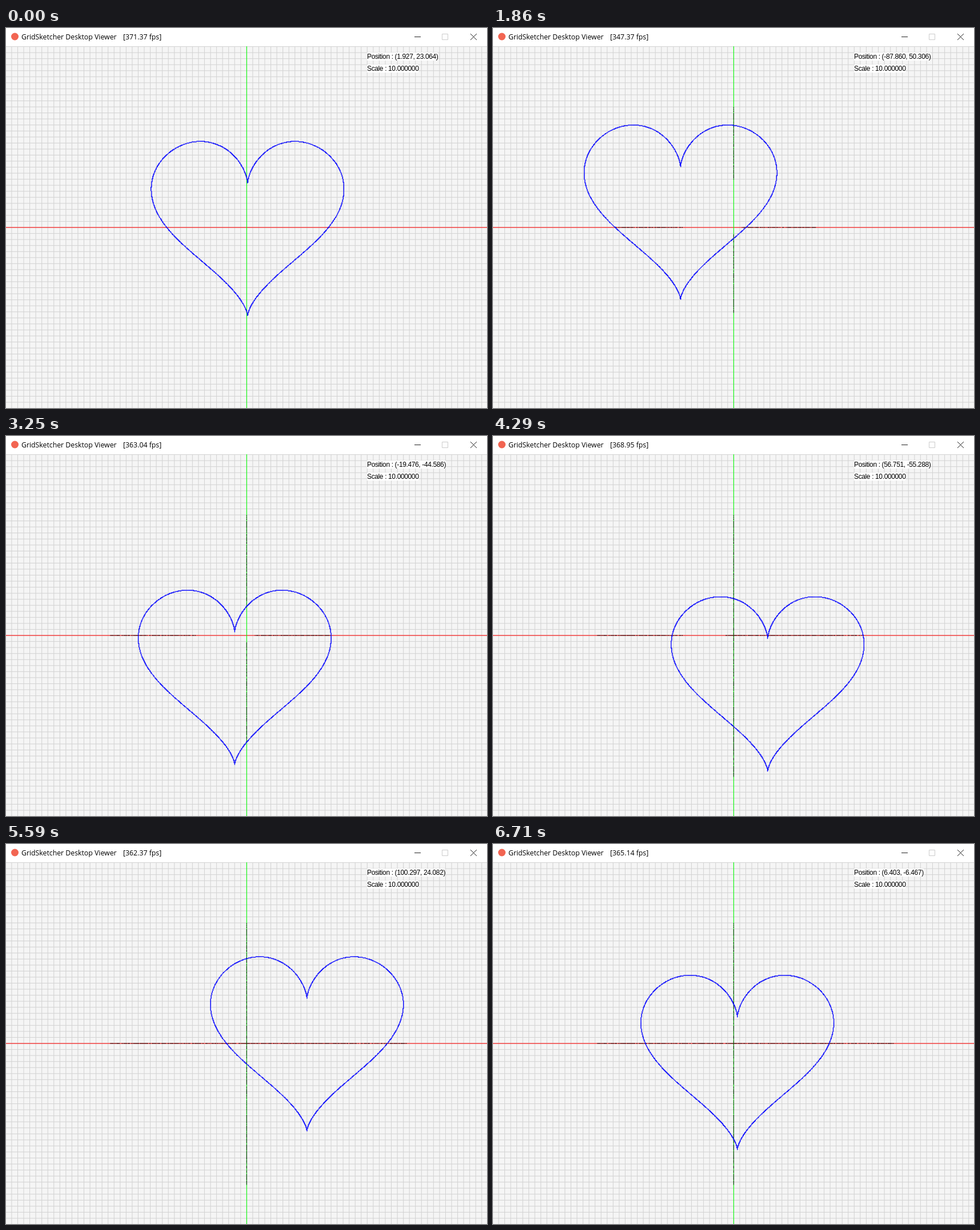
An HTML page with a canvas that plays this animation: 842 by 665 pixels, repeating every 6.78 s.

```html
<!DOCTYPE html>
<html lang="en">
<head>
<meta charset="utf-8">
<title>Heart on a grid</title>
<style>
  html, body { margin: 0; width: 100%; height: 100%; overflow: hidden; background: #fff; }
  #stage { position: relative; width: 842px; height: 665px; overflow: hidden; }
  canvas, svg { position: absolute; left: 0; top: 0; }
  span { position: absolute; white-space: pre; color: #000; }
  .bar { top: 7px; font: 12.3px/18px "Open Sans", "Noto Sans", sans-serif; }
  .info { left: 632px; font: 12px/14px "Liberation Sans", Arial, sans-serif; letter-spacing: -.37px; background: #fff; }
</style>
</head>
<body>
<div id="stage">
  <canvas id="view" width="842" height="665"></canvas>
  <svg width="842" height="32" fill="none">
    <circle cx="15.5" cy="15" r="6.5" fill="#f26552"/>
    <path d="M715 15.5h11" stroke="#222"/>
    <path d="M763.5 10.5h10v10h-10z" stroke="#ccc"/>
    <path d="M813 10l11 11M824 10l-11 11" stroke="#222"/>
  </svg>
  <span class="bar" style="left:27px">GridSketcher Desktop Viewer</span>
  <span class="bar" style="left:205px" id="fps"></span>
  <span class="info" style="top:43px" id="pos"></span>
  <span class="info" style="top:64px">Scale : 10.000000</span>
</div>
<script>
const LOOP = 6780, FIRST = 249, STEP = 69.35, LAST = 93;
const UNIT = 1.055, OX = 420.8, OY = 348.5, TOP = 32;
const ctx = document.getElementById('view').getContext('2d');
const fpsEl = document.getElementById('fps');
const posEl = document.getElementById('pos');

// Turning points of the steered path: step, x, y, frame rate.
const PATH = [
  [-0.35, 1.927, 23.064, 371.37], [6.4, 1.927, 68.1, 366], [9.2, -11.63, 81.66, 366],
  [11, -23.953, 81.66, 367.17], [16.2, -58.2, 81.66, 365], [23, -87.86, 50.306, 347.37],
  [26, -102, 36.1, 365], [43, -19.476, -44.586, 363.04], [50.3, 15, -79, 366],
  [53, 33, -79, 366], [58, 56.751, -55.288, 368.95], [72.4, 124.9, 12.8, 365],
  [74.8, 113.6, 24.082, 365], [77, 100.297, 24.082, 362.37], [86.5, 36.95, 24.082, 365],
  [LAST, 6.403, -6.467, 365.14]
];

const HEART = Array.from({ length: 2400 }, (_, i) => {
  const a = i / 2400 * 2 * Math.PI;
  return [
    160 * Math.sin(a) ** 3,
    130 * Math.cos(a) - 50 * Math.cos(2 * a) - 20 * Math.cos(3 * a) - 10 * Math.cos(4 * a)
  ];
});

function noise(n) {
  const v = Math.sin(n * 12.9898 + 4.1) * 43758.5453;
  return v - Math.floor(v);
}

function stateAt(step) {
  const i = Math.max(1, PATH.findIndex(p => p[0] >= step));
  const a = PATH[i - 1], b = PATH[i];
  const f = Math.max(0, (step - a[0]) / (b[0] - a[0]));
  const [x, y, rate] = [1, 2, 3].map(j => a[j] + (b[j] - a[j]) * f);
  return { x, y, fps: rate + 6 * Math.sin(Math.PI * f) * (noise(step) - 0.5) };
}

// Distinct cells of the heart, counted right and down from the origin.
function heartCells({ x, y }) {
  const cells = new Map();
  for (const [hx, hy] of HEART) {
    const cell = [Math.floor(hx + x), Math.floor(-hy - y)];
    cells.set(cell.join(), cell);
  }
  return [...cells.values()];
}

// The passing outline wears away the axes; each cell keeps the step it was first hit.
const worn = new Map();
for (let s = PATH[0][0]; s < LAST; s += 0.2) {
  for (const cell of heartCells(stateAt(s))) {
    const [cx, cy] = cell, key = cell.join();
    if ((cx && cy) || worn.has(key) || noise(cx + 2 * cy) < 0.25) continue;
    worn.set(key, { cell, s });
  }
}

function plot([cx, cy], size) {
  ctx.fillRect(OX + cx * UNIT, OY + cy * UNIT, size, size);
}

function gridLines(color, from, to) {
  ctx.fillStyle = color;
  for (let k = from; k <= to; k++) {
    ctx.fillRect(0, OY + k * 10 * UNIT, 842, UNIT);
    ctx.fillRect(OX + k * 10 * UNIT, TOP, UNIT, 633);
  }
}

function drawGrid() {
  ctx.fillStyle = '#f5f5f5';
  ctx.fillRect(0, TOP, 842, 633);
  gridLines('#d3d3d3', -40, 40);
  ctx.fillStyle = '#f00';
  ctx.fillRect(0, OY, 842, UNIT);
  ctx.fillStyle = '#0f0';
  ctx.fillRect(OX, TOP, UNIT, 633);
  ctx.clearRect(0, 0, 842, TOP);
}

let shown = null;
function show(t) {
  const step = Math.min(LAST, Math.floor((t - FIRST) / STEP));
  const now = Math.max(-1, step);
  if (now === shown) return;
  shown = now;
  const state = stateAt(now);
  drawGrid();
  ctx.fillStyle = '#111';
  for (const { cell, s } of worn.values()) if (s < now) plot(cell, UNIT);
  ctx.fillStyle = '#00f';
  for (const cell of heartCells(state)) plot(cell, 1.35);
  fpsEl.textContent = `[${state.fps.toFixed(2)} fps]`;
  posEl.textContent = `Position : (${state.x.toFixed(3)}, ${state.y.toFixed(3)})`;
}

const start = performance.now();
function loop() {
  show((performance.now() - start) % LOOP);
  requestAnimationFrame(loop);
}
loop();
</script>
</body>
</html>
```
